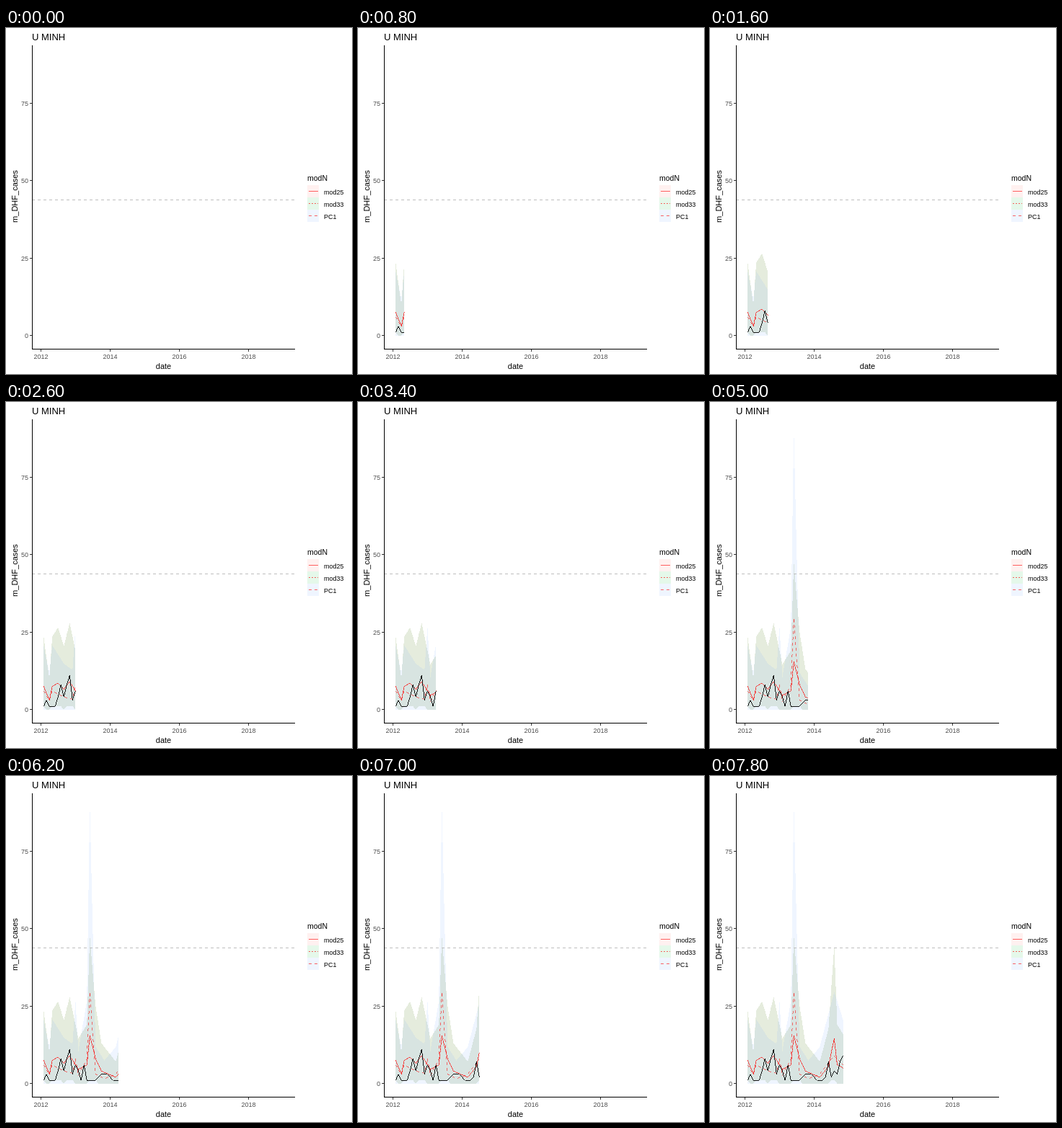
Animation, 480 px wide and 480 px high, one loop 8000 ms. Source, as an HTML page:

```html
<!DOCTYPE html>
<html lang="en">
<head>
<meta charset="utf-8">
<title>Monthly cases</title>
<style>
  html, body { margin: 0; width: 100%; height: 100%; overflow: hidden; background: #fff; }
  svg { display: block; width: 100vw; height: 100vh; font-family: "Liberation Sans", Arial, sans-serif; }
  path, rect { shape-rendering: crispEdges; }
</style>
</head>
<body>
<svg id="chart" viewBox="0 0 480 480"></svg>
<script>
const chart = document.getElementById("chart");
const DAY = 864e5, STEP = 200, LOOP = 8000;
const MONTHS = 34, ALL_MONTHS = 83, LAST_STEP = 99;
const RED = "rgba(255,0,0,.6)";
const DASH = { mod25: "none", mod33: "2 2", PC1: "4 4" };
const FILL = { mod25: "#F8766D", mod33: "#00BA38", PC1: "#619CFF" };

// Turning points of the two forecasts: [month, cases], straight in between.
const modelTurns = [[0, 7.5], [2, 3], [3, 7.5], [5, 8.5], [7, 6.5], [9, 9], [12, 4.5], [15, 6],
  [16, 15.5], [18, 8], [20, 4], [25, 2], [28, 5.5], [30, 14.5], [31, 6], [33, 5]];
const pcTurns = [[0, 6], [2, 3], [3, 6], [7, 4], [10, 3.3], [11, 8], [12, 2.5], [15, 8],
  [16, 29.5], [18, 3], [21, 1.5], [25, 3], [30, 9], [33, 6]];
// Flare-ups above one case a month: [centre, height, half width].
const flares = [[1, 2, 1], [5.95, 7, 1.7], [8.65, 12.5, 1.6], [11.3, 7, 1.3], [14, 5, 1],
  [21, 2.4, 3], [28, 6, 1.2], [30, 3, 1], [32.8, 9, 2.4]];

const mix = (a, b, t) => a + (b - a) * t;
const monthly = rule => Array.from({ length: MONTHS }, (_, m) => rule(m));
const follow = turns => m => {
  const next = Math.max(1, turns.findIndex(([month]) => month >= m));
  const [m0, v0] = turns[next - 1], [m1, v1] = turns[next];
  return mix(v0, v1, (m - m0) / (m1 - m0));
};

const model = monthly(follow(modelTurns));
const pc = monthly(follow(pcTurns));
const cases = monthly(m => Math.round(flares.reduce(
  (sum, [centre, height, width]) => sum + height * Math.max(0, 1 - Math.abs(m - centre) / width), 1)));
const modelUpper = model.map(v => 3 * v + 1);
const modelLower = model.map(v => Math.min(1, Math.max(0, v - 6.5)));
const pcUpper = pc.map(v => 2.95 * v + 3);
const pcLower = pc.map(() => 0);

const dayOf = (year, month) => (Date.UTC(year, month) - Date.UTC(2012, 0)) / DAY;
const xOf = day => 48.2 + day * 0.1317;
const yOf = v => 426.5 - v * 4.293;
const days = monthly(m => dayOf(2012, 1 + m));
const span = dayOf(2012, 1 + ALL_MONTHS) - days[0];
const arrival = days.map(d => Math.round((d - days[0]) * LAST_STEP / span));

function add(tag, attrs, content = "") {
  const el = document.createElementNS("http://www.w3.org/2000/svg", tag);
  for (const key in attrs) el.setAttribute(key, attrs[key]);
  el.textContent = content;
  return chart.appendChild(el);
}
const text = (x, y, size, content, attrs = {}) => add("text", { x, y, "font-size": size, ...attrs }, content);
const stroke = (d, color, dash = "none", width = 1) =>
  add("path", { d, fill: "none", stroke: color, "stroke-dasharray": dash, "stroke-width": width });
const ribbon = name => add("path", { fill: FILL[name], "fill-opacity": 0.1 });
const curve = (color, dash) => stroke("", color, dash, 0.9);

const layers = [
  [ribbon("mod25"), modelUpper, modelLower],
  [ribbon("mod33"), modelUpper, modelLower],
  [ribbon("PC1"), pcUpper, pcLower],
  [curve(RED, DASH.mod25), model],
  [curve(RED, DASH.mod33), model],
  [curve(RED, DASH.PC1), pc],
  [curve("#000"), cases]
];

stroke("M36 238.5H401", "#bebebe", "4 4");
stroke("M36.5 24V446M36 445.5H401", "#000");

const tickLabel = { fill: "#4d4d4d" };
for (let v = 0; v <= 75; v += 25) {
  const y = Math.floor(yOf(v)) + 0.5;
  stroke(`M33 ${y}H36`, "#333");
  text(31, y + 3.5, 9, v, { ...tickLabel, "text-anchor": "end" });
}
for (let year = 2012; year <= 2018; year += 2) {
  const x = Math.floor(xOf(dayOf(year, 0))) + 0.5;
  stroke(`M${x} 446V449`, "#333");
  text(x, 459, 9, year, { ...tickLabel, "text-anchor": "middle" });
}
text(36, 17, 13, "U MINH");
text(218.5, 473, 11, "date", { "text-anchor": "middle" });
text(0, 0, 11, "m_DHF_cases", { "text-anchor": "middle", transform: "translate(15.5 233.5) rotate(-90)" });

text(418, 212, 10.5, "modN");
Object.keys(DASH).forEach((name, i) => {
  const y = 218 + i * 17;
  add("rect", { x: 418, y, width: 16, height: 17, fill: FILL[name], "fill-opacity": 0.1 });
  stroke(`M420 ${y + 8.5}H433`, RED, DASH[name]);
  text(441, y + 12.5, 9, name);
});

function draw(step) {
  const last = arrival.findLastIndex(a => a <= step);
  const part = last + 1 < MONTHS ? (step - arrival[last]) / (arrival[last + 1] - arrival[last]) : 0;
  const reveal = values => {
    const shown = values.slice(0, last + 1);
    if (part > 0) shown.push(mix(values[last], values[last + 1], part));
    return shown;
  };
  const xs = reveal(days).map(xOf);
  const points = values => reveal(values).map((v, i) => `${xs[i].toFixed(2)} ${yOf(v).toFixed(2)}`);

  for (const [path, top, bottom] of layers) {
    const outline = bottom ? [...points(top), ...points(bottom).reverse()] : points(top);
    path.setAttribute("d", step ? "M" + outline.join("L") : "");
  }
}

function tick() {
  draw(Math.floor(performance.now() % LOOP / STEP));
  requestAnimationFrame(tick);
}
tick();
</script>
</body>
</html>
```
